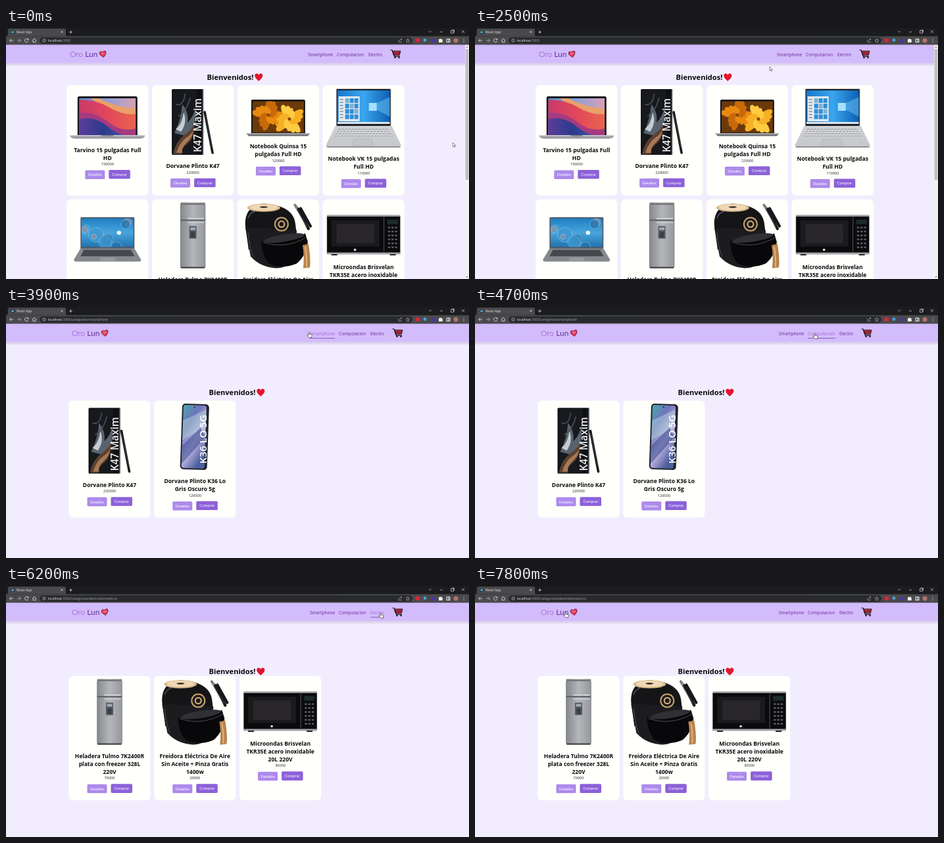
These frames come from a looping animation (704 by 382 pixels, 8 s). An HTML page:

```html
<!DOCTYPE html>
<html lang="es">
<head>
<meta charset="utf-8">
<title>Tienda</title>
<style>
  html, body { margin: 0; height: 100%; overflow: hidden; background: #f2edfe; }
  #stage { display: block; width: 100vw; height: 100vh; font-family: "Open Sans", "Noto Sans", sans-serif; }
  .button { font-family: "Liberation Sans", Arial, sans-serif; }
  .brand { font-family: Lato, sans-serif; font-weight: 300; }
</style>
</head>
<body>
<svg id="stage" viewBox="0 0 704 382"></svg>
<script>
const LOOP = 8000;

// Markup helpers
const rect = (x, y, w, h, fill, more = '') =>
  `<rect x="${x}" y="${y}" width="${w}" height="${h}" fill="${fill}" ${more}/>`;
const dot = (x, y, r, fill, more = '') => `<circle cx="${x}" cy="${y}" r="${r}" fill="${fill}" ${more}/>`;
const oval = (x, y, rx, ry, fill, more = '') =>
  `<ellipse cx="${x}" cy="${y}" rx="${rx}" ry="${ry}" fill="${fill}" ${more}/>`;
const shape = (d, fill, more = '') => `<path d="${d}" fill="${fill}" ${more}/>`;
const line = (d, color, width = 1, more = '') =>
  `<path d="${d}" fill="none" stroke="${color}" stroke-width="${width}" ${more}/>`;
const text = (x, y, size, fill, str, more = '') =>
  `<text x="${x}" y="${y}" font-size="${size}" fill="${fill}" ${more}>${str}</text>`;
const at = (x, y, content, more = '') => `<g transform="translate(${x} ${y}) ${more}">${content}</g>`;
const screen = (x, y, w, h, content) => `<svg x="${x}" y="${y}" width="${w}" height="${h}">${content}</svg>`;
const repeat = (n, fn) => Array.from({ length: n }, (_, i) => fn(i)).join('');
const gradient = (id, stops, dir = 'x2="0" y2="1"') =>
  `<linearGradient id="${id}" ${dir}>${stops.map((c, i) =>
    `<stop offset="${i / (stops.length - 1)}" stop-color="${c}"/>`).join('')}</linearGradient>`;
const middle = 'text-anchor="middle"';

const defs = `<defs>
  ${gradient('shade', ['#d3c9e4', '#f2edfe'])}
  ${gradient('metal', ['#85888c', '#b4b6ba', '#96989d'], '')}
  ${gradient('silver', ['#cfd0d4', '#c6c7cb'])}
  ${gradient('dusk', ['#5d8fd0', '#8f9fd6', '#d9a0b4'], '')}
  ${gradient('ember', ['#c93a6c', '#e2475a', '#e8654f'], '')}
  ${gradient('night', ['#5b3d9a', '#2b3a8c', '#3f57ad'], '')}
  ${gradient('sky', ['#1677cc', '#3aa6ee', '#0d5fb4'], '')}
  ${gradient('lagoon', ['#1f7fc4', '#48a5dc', '#2272ae'])}
  ${gradient('aurora', ['#4aa7ad', '#6f74bd', '#c4b6e4', '#4c5f9c'], 'x2=".6" y2="1"')}
</defs>`;

// Product pictures, drawn around the centre of their card
const slimLaptop = () =>
  rect(-45.5, -67, 91, 62, '#17181c', 'rx="2.5"') +
  screen(-43, -64, 86, 56,
    rect(0, 0, 86, 56, 'url(#dusk)') +
    shape('M30 0Q58 14 86 16V30Q50 26 18 0Z', '#e9a06a') +
    shape('M0 2Q26 2 46 14T86 24V56H0Z', 'url(#ember)') +
    shape('M0 22Q24 20 44 36T86 46V56H0Z', '#a63a80') +
    shape('M0 32Q22 26 42 42T74 56H0Z', 'url(#night)')) +
  shape('M-57-7H57Q56-3 49-2.5H-49Q-56-3-57-7Z', '#9b9da2') +
  rect(-57, -8, 114, 1.6, '#c9cace') + rect(-9, -8, 18, 2, '#85878b');

const penPhone = () =>
  rect(-32, -78, 48, 100, '#0f1013', 'rx="1.5"') +
  screen(-30, -77, 36, 98,
    rect(0, 0, 36, 98, '#17191d') +
    shape('M2 66Q12 46 14 22Q24 34 22 50Q32 40 34 26Q38 60 18 70Z', '#59636d') +
    shape('M4 60Q14 52 16 34Q22 50 12 64Z', '#c4cbd2') +
    shape('M0 98Q4 78 18 68T32 50Q34 72 22 82T14 98Z', '#5e4030') +
    shape('M5 96Q10 80 20 73T31 60Q30 72 21 80T14 96Z', '#a87a56') +
    line('M4 22Q16 26 18 6M8 40Q20 34 26 12', '#48525c', 1.6)) +
  rect(14.5, -78, 1.5, 100, '#55585e') +
  text(0, 0, 15.4, '#f4f4f4', 'K47 Maxim', 'font-weight="600" transform="translate(13 18) rotate(-90)"') +
  line('M18-43L30 19', '#17181b', 3.6, 'stroke-linecap="round"') + line('M19-38L29 12', '#4b4f55', .8);

// Petals of two blossoms, laid from the outside in
const petal = i => {
  const reach = 24 - i * .38;
  return oval(reach * .62, 0, reach * .5, reach * .24, ['#e88a10', '#f7b024', '#c9690a', '#ffcb42'][i % 4],
    `transform="translate(${i % 2 ? 56 : 24} ${i % 2 ? 27 : 21}) rotate(${i * 137.5})"`);
};
const flowerLaptop = () =>
  rect(-41, -62, 82, 54, '#18181a', 'rx="2"') +
  screen(-39, -59.5, 78, 48,
    rect(0, 0, 78, 48, '#6b3a0a') + repeat(54, petal) + dot(24, 21, 2.5, '#8a480a') + dot(56, 27, 2.5, '#8a480a')) +
  shape('M-48-10H48L45-6.5H-45Z', '#6d6f73') + rect(-48, -11, 96, 2, '#a9abae');

const tileLaptop = () =>
  rect(-42, -79, 84, 58, '#bcbec2', 'rx="2"') + rect(-41, -78, 82, 56, '#1d2026', 'rx="1"') +
  screen(-40, -76, 80, 51,
    rect(0, 0, 80, 51, 'url(#sky)') +
    shape('M80 10L50 24L80 40Z', '#6cc4f6', 'opacity=".5"') + rect(48, 19, 12, 12, '#a5e0fd') +
    rect(2, 9, 32, 38, '#e3eaf3') +
    repeat(12, i => rect(12 + i % 3 * 7, 12 + Math.floor(i / 3) * 8.2, 6, 7, i % 4 ? '#2f8fd6' : '#7bb3cf')) +
    repeat(7, i => rect(4, 13 + i * 4.6, 5, 1.4, '#7c8790')) +
    rect(0, 48, 80, 3, '#dce6ee')) +
  shape('M-43-22H43L57 7Q57 11 53 11H-53Q-57 11-57 7Z', 'url(#silver)') +
  shape('M-39-19H39L46-5H-46Z', '#dcdde0') +
  repeat(4, i => line(`M${-39 - i * 2}${-17 + i * 3.5}H${39 + i * 2}`, '#aaacb1', 2.2, 'stroke-dasharray="4.2 .9"')) +
  shape('M-15-2H13L15 8H-17Z', '#c3c4c8', 'stroke="#a8a9ad" stroke-width=".5"') +
  rect(-56, 9, 112, 2, '#8f9195', 'rx="1"');

const bubbleLaptop = () =>
  rect(-41, -67.5, 82, 48, '#54585e', 'rx="1.5"') +
  screen(-39.5, -66, 79, 44,
    rect(0, 0, 79, 44, 'url(#lagoon)') +
    repeat(9, i => dot((i * 31 + 8) % 79, (i * 19 + 14) % 46, 4 + i * 5 % 8,
      ['#3f97cf', '#2672ad', '#8b93a3'][i % 3], 'opacity=".75" stroke="#a9d8ee" stroke-width=".6"')) +
    dot(57, 22, 3.2, '#eef6fa')) +
  shape('M-41-20H41L51-3Q51 0 48 0H-48Q-51 0-51-3Z', '#85888d') +
  shape('M-36-18H36L41-8H-41Z', '#505358') +
  repeat(3, i => line(`M${-36 - i * 2}${-16 + i * 3}H${36 + i * 2}`, '#3a3c41', 1.6, 'stroke-dasharray="3.5 .8"')) +
  shape('M-10-6H11L13-1H-12Z', '#96999d');

const fridge = () =>
  rect(-19, -90, 38, 100, 'url(#metal)', 'rx="1.5"') +
  rect(-18, -89, 36, 2.5, '#74777b') +
  rect(-19, -64, 38, 1.8, '#55585d') + rect(-8, -66.5, 25, 2, '#d2d3d6') +
  rect(-8, -60.5, 25, 1.8, '#cbccd0') +
  rect(-5.5, -54, 11, 19, '#55585e', 'rx="1"') + rect(-4, -52, 8, 4, '#9fadb9') + rect(-3, -45, 6, 8, '#3b3e43') +
  line('M-18.7-86V8M18.7-86V8', '#77797e', .8) + rect(-18, 8, 36, 2, '#3a3c40');

const fryer = () =>
  shape('M-50-55C-51-74-42-87-22-88C6-87 24-77 26-58L28-42L-30-22L-45-18Z', '#151517') +
  shape('M-50-52L-42-8Q-28 8-4 10Q14 10 26-4L28-48Z', '#1c1c1f') +
  oval(-22, -82, 25, 6.2, '#d9b98e') + oval(-22, -82.6, 21, 4.8, '#efd8b4') +
  oval(-22, -83, 6, 1.4, '#3d352c') +
  line('M-46-66Q-43-75-34-77', '#67676d', 1.2) +
  dot(5, -57, 11, '#c9a36c') + dot(5, -57, 9, '#1d1b1b') + dot(5, -57, 5.5, '#d9b47d') + dot(5, -57, 3.5, '#1d1b1b') +
  shape('M-26-32Q8-22 41-43L45-30Q42-8 28 3Q6 12-14 3Q-25-8-26-32Z', '#08080a') +
  oval(9, -36, 31, 5.5, '#303036', 'transform="rotate(-9 9 -36)"') +
  line('M-24-30Q10-18 43-37M-46-45Q-44-20-38-8', '#55555b', .9) +
  shape('M37-25L46-27Q50-2 48 9L38 10Q40-8 37-25Z', '#b8834d') +
  line('M41-23Q44-6 43 8', '#dfb57d', 2) +
  line('M24-87L40-60M25-88L45-63', '#77797e', 2) +
  line('M31-80L46-50M34-81L49-54', '#19191b', 4.2, 'stroke-linecap="round"') +
  line('M31-75L44-53', '#606268', .8);

const microwave = () =>
  rect(-56, -71, 112, 60, '#999b9f', 'rx="1.5"') + rect(-55.5, -68.5, 111, 55, '#0b0b0d') +
  rect(-49, -63, 73, 40, '#1b1a1d') + rect(-41, -57, 57, 29, '#29272a') +
  line('M31-68V-15', '#55575b', 1) +
  rect(36, -64, 16, 7, '#1d2b2d') +
  repeat(18, i => rect(37 + i % 3 * 5.3, -53 + Math.floor(i / 3) * 6, 3.6, 2.4, '#5d5e62', 'rx="1"')) +
  dot(-13, -18, 1.8, '#e9e9eb') + rect(-56, -14, 112, 2.5, '#a4a6a9') +
  rect(-49, -11.5, 9, 2, '#222') + rect(40, -11.5, 9, 2, '#222');

const tallPhone = () =>
  rect(-21, -84, 41, 100, '#22242c', 'rx="5" transform="rotate(2 0 -34)"') +
  `<g transform="rotate(2 0 -34)">${rect(-19, -82, 35, 96, 'url(#aurora)', 'rx="3.5"')}
  ${shape('M-19-58L16-76V-50L-19-28Z', '#b9ddd9', 'opacity=".45"')}
  ${shape('M-19-20L8-48L16-34L-19 8Z', '#3b4f91', 'opacity=".6"')}
  ${dot(-2, -79, 1, '#15161b')}</g>` +
  text(0, 0, 15.2, '#fff', 'K36 LO 5G', 'font-weight="600" transform="translate(18 7) rotate(-90)"');

// top: centre of the first title line, relative to the card centre
const products = {
  slim: { draw: slimLaptop, top: 14.5, title: ['Tarvino 15 pulgadas Full', 'HD'], price: 150000 },
  pen: { draw: penPhone, top: 39, title: ['Dorvane Plinto K47'], price: 220000 },
  flower: { draw: flowerLaptop, top: 9, title: ['Notebook Quinsa 15', 'pulgadas Full HD'], price: 120000 },
  tile: { draw: tileLaptop, top: 28, title: ['Notebook VK 15 pulgadas', 'Full HD'], price: 110000 },
  bubble: { draw: bubbleLaptop, top: 33.5, title: ['Notebook Orvu 15', 'pulgadas Full HD'], price: 90000 },
  fridge: { draw: fridge, top: 27.5, title: ['Heladera Tulmo 7K2400R', 'plata con freezer 328L', '220V'], price: 70000 },
  fryer: { draw: fryer, top: 27.5, title: ['Freidora Eléctrica De Aire', 'Sin Aceite + Pinza Gratis', '1400w'], price: 20000 },
  microwave: { draw: microwave, top: 8.5, title: ['Microondas Brisvelan', 'TKR35E acero inoxidable', '20L 220V'], price: 30000 },
  tall: { draw: tallPhone, top: 33.5, title: ['Dorvane Plinto K36 Lo', 'Gris Oscuro 5g'], price: 120000 },
};

const button = (x, y, w, fill, label) =>
  rect(x, y - 6.9, w, 13.6, fill, 'rx="1.6"') +
  text(x + w / 2, y + 2, 5.85, '#fff', label, `${middle} class="button"`);

function card(name, column, left, cy, height) {
  const { draw, top, title, price } = products[name];
  const last = top + (title.length - 1) * 11.8;
  return at(left + 62 + column * 129.8, cy,
    rect(-62, -height / 2, 124, height, '#fffffc', 'rx="6"') + draw() +
    title.map((s, i) => text(0, top + 3.2 + i * 11.8, 8.55, '#0b0b0d', s, `${middle} font-weight="700"`)).join('') +
    text(0, last + 11.7, 5.55, '#1b1b1f', price, middle) +
    button(-34, last + 26, 30, '#ad8aec', 'Detalles') + button(2, last + 25.6, 32.5, '#8c61d9', 'Comprar'));
}

const row = (names, left, cy, height) => names.map((n, i) => card(n, i, left, cy, height)).join('');
const heart = fill => shape('M0 6C-3 3-6 1-6-2.3C-6-6-1.6-6.7 0-3.5C1.6-6.7 6-6 6-2.3C6 1 3 3 0 6Z', fill);
const welcome = (x, y) =>
  text(x, y + 4, 11.1, '#08080a', 'Bienvenidos!', `${middle} font-weight="700"`) + at(x + 43.3, y + .4, heart('#e3152f'));

const pages = {
  home: welcome(341, 74.5) + row(['slim', 'pen', 'flower', 'tile'], 92.3, 171, 168) +
    row(['bubble', 'fridge', 'fryer', 'microwave'], 92.3, 355.6, 189),
  smartphone: welcome(344, 129.7) + row(['pen', 'tall'], 95.5, 231.5, 178),
  computacion: welcome(344, 129.7) + row(['slim', 'flower', 'tile', 'bubble'], 95.5, 231.5, 178),
  electrodomesticos: welcome(344, 129.7) + row(['fridge', 'fryer', 'microwave'], 95.5, 231.5, 189),
};

const links = [['Smartphone', 459, 497], ['Computacion', 503, 545], ['Electro', 551, 572]];
const cart =
  shape('M587.5 35H600L598.3 41.5H589.5Z', '#e0324a', 'stroke="#17131a" stroke-width=".9"') +
  line('M588 37.2H599.5M588.8 39.4H599', '#17131a', .8) +
  line('M584.5 33.5H587L590.5 43.3H599', '#17131a', 1.2) +
  dot(591.5, 45, 1.2, '#17131a') + dot(597.5, 45, 1.2, '#17131a');
const header =
  text(97, 43.6, 12, '#8b43c8', 'Oro <tspan fill="#65309c" font-weight="400">Lun</tspan>', 'class="brand"') +
  at(147.5, 39.8, heart('#5e1730') + `<g transform="scale(.85)">${heart('#e53a5c')}</g>` +
    line('M-3-2.5L-1 0L1-2L3 0', '#ffb5c5', .9), 'rotate(-10) scale(.88)') +
  links.map(([label, x1, x2], i) => `<g id="link${i}">${text(x1, 42.8, 6.6, '#6a2199', label)}
    ${rect(x1, 47, x2 - x1, .9, '#8a50b5')}</g>`).join('') + cart;

const pale = '#d6d7da';
const browser =
  rect(0, 0, 704, 25.5, '#4a4a4c') + rect(0, 0, 704, 12.5, '#1b1c1e') +
  shape('M0 12.5Q3 12 3 9V3Q3 1 5 1H89Q91 1 91 3V10Q91 12.5 94 12.5Z', '#4a4a4c') +
  dot(10, 6.2, 2.8, '#23343b') + dot(10, 6.2, 1.7, '#4cb4d4') + text(16, 8, 5, '#e8e8ea', 'React App') +
  line('M83.5 4.5L86.5 7.5M86.5 4.5L83.5 7.5M98.5 3.8V8.6M96 6.2H101', pale, .8) +
  line('M643 4.5L645 6.5L647 4.5M660 6H664M676.5 4H680.5V8H676.5ZM678 4V3H681.5V6.5H680.5M693 3.5L697 7.5M697 3.5L693 7.5', pale, .7) +
  line('M11 19H5.5M8 16.5L5.5 19L8 21.5', pale, .9) + line('M17 19H22.5M20 16.5L22.5 19L20 21.5', '#a5a6a9', .9) +
  line('M33.5 17.5A2.7 2.7 0 1 0 33.7 20M34 16V18H32M40 19L43 16.2L46 19M41 18.5V21.5H45V18.5', pale, .9) +
  rect(51, 14.2, 567, 9.8, '#292a2d', 'rx="4.9"') +
  dot(58, 19, 2.3, 'none', `stroke="${pale}" stroke-width=".6"`) + line('M58 18.5V20.4M58 17.3V17.9', pale, .6) +
  text(64, 20.8, 5.05, '#f0f0f2', 'localhost<tspan id="path" fill="#a5a6aa"></tspan>') +
  line('M597 18V21.5H601V20M598.5 19.5Q599 17 602 17M600.5 15.8L602 17L600.5 18.2', pale, .5) +
  line('M611 16L611.9 18.2L614 18.4L612.4 19.8L612.9 22L611 20.8L609.1 22L609.6 19.8L608 18.4L610.1 18.2Z', pale, .5) +
  rect(622.5, 16, 6.5, 5.5, '#d8263f') + dot(637, 18.5, 2.4, '#4d9de0') + dot(649.5, 19.5, 3, '#4436a8') +
  shape('M658 17H659.5A1.2 1.2 0 0 1 661.8 17H663.5V19A1.2 1.2 0 0 1 663.5 21V22H658Z', '#f0f0f2') +
  line('M670 16.8H675V21.5H670ZM673 17V21.5', '#f0f0f2', 1) + dot(684, 19, 3.5, '#b2736b') +
  repeat(3, i => dot(696, 16.8 + i * 2.2, .6, pale));

const scrollbar = rect(698, 26, 6, 356, '#f1f1f1') + rect(698.6, 32, 4.8, 199, '#bfbfc1') +
  shape('M699.3 30L701 28L702.7 30ZM699.3 378L701 380L702.7 378Z', '#777');
const arrow = shape('M0 0V7.3L1.7 5.8L2.9 8.4L4.1 7.9L3 5.3H5.2Z', '#fff', 'stroke="#222" stroke-width=".65"');
const hand = shape('M-.8 .7Q0-.5 .9 .7V3.1L4 3.7Q5 4 4.9 5.2L4.3 8.3H-.1L-2.5 5.2Q-2.7 4-1.6 4.3L-.8 5Z',
  '#fff', 'stroke="#222" stroke-width=".65"');

const stage = document.getElementById('stage');
stage.innerHTML = defs + rect(0, 0, 704, 382, '#f2edfe') +
  Object.entries(pages).map(([name, content]) => `<g id="${name}">${content}</g>`).join('') +
  rect(0, 53.5, 704, 5, 'url(#shade)') + rect(0, 25, 704, 28.5, '#d3bcfc') +
  `<g id="header">${header}</g><g id="scrollbar">${scrollbar}</g>` + browser +
  `<g id="cursor"><g id="arrow" transform="scale(.82)">${arrow}</g><g id="hand" transform="scale(.95)">${hand}</g></g>`;
const el = id => document.getElementById(id);
const show = (id, on) => el(id).setAttribute('display', on ? 'inline' : 'none');

// Cursor stops: time, x, y and sag of the way there
const stops = [
  [0, 679.5, 174.5], [700, 679.5, 174.5], [1400, 489.7, 151], [1600, 489.7, 151], [2500, 448, 59],
  [2700, 448, 59], [3400, 462, 39.5], [3800, 462, 39.5], [3900, 460.5, 38.5], [4700, 516.5, 40.5],
  [5100, 516.5, 40.5], [6000, 569.5, 41], [6700, 569.5, 41], [7500, 137.5, 40, 11], [LOOP, 137.5, 40],
];
function cursorAt(t) {
  const i = stops.findIndex(s => s[0] > t);
  const [t0, x0, y0] = stops[i - 1], [t1, x1, y1, sag = 0] = stops[i];
  const p = (t - t0) / (t1 - t0), k = p * p * (3 - 2 * p);
  return [x0 + (x1 - x0) * k, y0 + (y1 - y0) * k + sag * Math.sin(Math.PI * k)];
}

// Latest entry whose start time has passed
const current = (schedule, t) => schedule.filter(([start]) => start <= t).pop()[1];
const pageTimes = [[0, 'home'], [3900, 'smartphone'], [5000, 'computacion'], [6200, 'electrodomesticos']];
const pathTimes = [[0, 'home'], [3600, 'smartphone'], ...pageTimes.slice(2)];

function render(now) {
  const t = Math.floor(now % LOOP / 100) * 100;
  const page = current(pageTimes, t), path = current(pathTimes, t);
  const shift = page === 'home' ? 0 : 3;
  const [x, y] = cursorAt(t);

  Object.keys(pages).forEach(name => show(name, name === page));
  show('scrollbar', page === 'home');
  el('header').setAttribute('transform', `translate(${shift})`);
  el('path').textContent = ':3000' + (path === 'home' ? '' : '/categories/' + path);

  let pointing = t >= 7800;
  links.forEach(([, x1, x2], i) => {
    const over = y > 33 && y < 48 && x > x1 + shift - 2 && x < x2 + shift;
    pointing ||= over;
    const [label, underline] = el('link' + i).children;
    label.setAttribute('fill', over ? '#a866dc' : '#6a2199');
    underline.setAttribute('opacity', over ? 1 : 0);
  });
  el('cursor').setAttribute('transform', `translate(${x} ${y})`);
  show('arrow', !pointing);
  show('hand', pointing);
}

const start = performance.now();
function tick() {
  render(performance.now() - start);
  requestAnimationFrame(tick);
}
tick();
</script>
</body>
</html>
```
